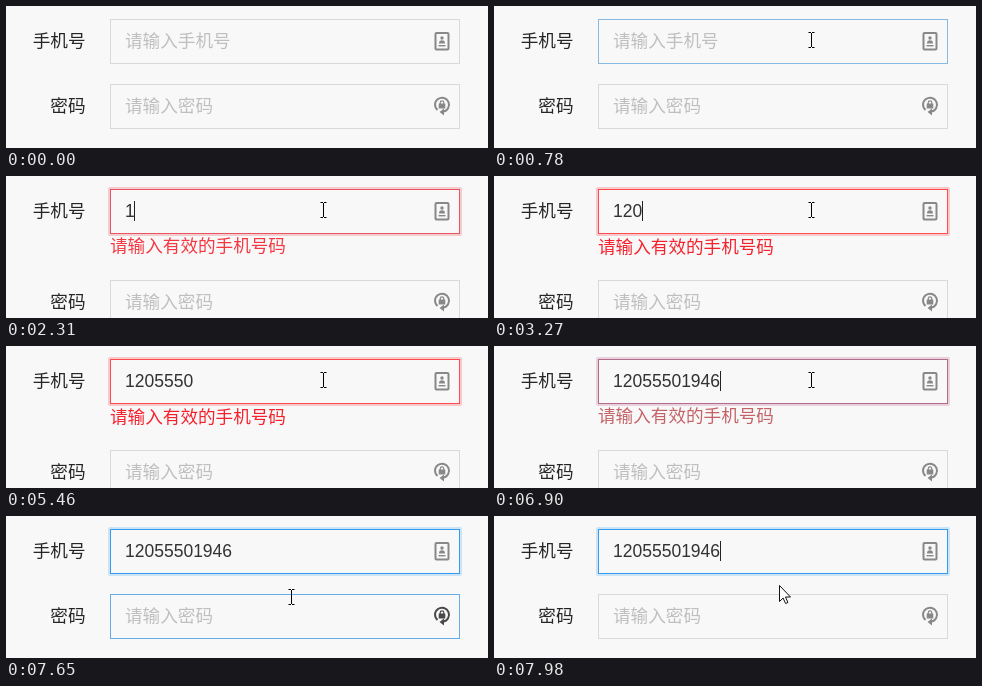
An HTML page for the animation above (8000 ms loop, 482 by 142 pixels).

```html
<!DOCTYPE html>
<html lang="zh">
<head>
<meta charset="utf-8">
<style>
  html, body { margin: 0; width: 100%; height: 100%; overflow: hidden; background: #f8f8f8; }
  svg { display: block; font: 300 17.6px "Noto Sans CJK SC", "Noto Sans CJK", sans-serif; fill: none; }
  .label { fill: #262626; text-anchor: end; }
  .hint { fill: #bfbfbf; }
  #value { fill: #333; font: 17.5px "Liberation Sans", Arial, sans-serif; }
  .icon { stroke: #888; stroke-width: 2; }
  .icon .solid { fill: #888; stroke: none; }
</style>
</head>
<body>
<svg width="482" height="142" viewBox="0 0 482 142">
  <rect id="glow" x="103" y="12" width="352" height="47" rx="1" stroke-width="2"/>
  <rect id="border1" x="104.5" y="13.5" width="349" height="44"/>
  <text class="label" x="79.5" y="41">手机号</text>
  <text class="hint" id="hint" x="119" y="41">请输入手机号</text>
  <text id="value" x="119" y="41"></text>
  <path id="caret" d="M0 25V45" stroke="#222"/>
  <g class="icon">
    <rect x="429.5" y="27" width="13" height="16.5" rx="1"/>
    <circle class="solid" cx="436" cy="32" r="1.7"/>
    <path class="solid" d="M433 37.5q0-3.2 3-3.2t3 3.2z"/>
    <path d="M432.5 39.7h7" stroke-width="1.4"/>
  </g>
  <text id="error" x="104" y="77">请输入有效的手机号码</text>
  <g id="row2">
    <rect id="border2" x="104.5" y="78.5" width="349" height="44"/>
    <text class="label" x="79.5" y="106">密码</text>
    <text class="hint" x="119" y="106">请输入密码</text>
    <g class="icon" id="lock">
      <path d="M431.5 104A7 7 0 1 1 437 105.6"/>
      <path class="solid" d="M433.5 106l4.5-3.5v7z"/>
      <rect class="solid" x="432.7" y="97.5" width="6.6" height="5" rx=".5"/>
      <path d="M434.2 98v-1.3a1.8 1.8 0 0 1 3.6 0V98" stroke-width="1.2"/>
    </g>
  </g>
  <path id="beam" d="M-3-7.5h2.5M.5-7.5H3M0-7V7M-3 7.5h2.5M.5 7.5H3" stroke="#000"/>
  <path id="arrow" d="M.5.5v16l3.6-3.5 2.5 5.5 2.3-1-2.4-5.5h5z" fill="#fff" stroke="#111"/>
</svg>
<script>
const LOOP = 8000, DIGIT = 9.73;
const NUMBER = "12055501946";
const keyTimes = [2130, 2970, 3270, 4230, 4440, 4740, 4980, 5670, 5790, 6510, 6810];
const caretOff = [[0, 1170], [1650, 2130], [2640, 2970], [3780, 4230], [5460, 5670], [6330, 6510], [7320, 7830]];
const mousePath = [
  [600, 457, 28], [660, 457, 28], [720, 331, 32], [780, 317, 34],
  [7290, 317, 34], [7410, 308, 44], [7530, 288, 82], [7590, 285, 86], [7650, 285, 81], [7740, 285, 69]
];
const GRAY = [217, 217, 217], BLUE = [52, 155, 238], RED = [255, 77, 79];
const ERROR = [245, 34, 45], MUTED = [136, 136, 136];

const $ = id => document.getElementById(id);
const set = (id, attrs) => { for (const k in attrs) $(id).setAttribute(k, attrs[k]); };
const show = (id, on) => set(id, { visibility: on ? "visible" : "hidden" });
const linear = (t, start, length = 300) => Math.min(1, Math.max(0, (t - start) / length));
// Close to the CSS "ease" curve
const ease = (t, start, length) => 1 - (1 - linear(t, start, length) ** 1.4) ** 3.3;
const mix = (a, b, p) => a.map((v, i) => v + (b[i] - v) * p);
const rgb = c => `rgb(${c.map(Math.round)})`;

function mouseAt(t) {
  const next = mousePath.findIndex(k => k[0] > t);
  if (next < 1) return mousePath[next < 0 ? mousePath.length - 1 : 0].slice(1);
  const a = mousePath[next - 1], b = mousePath[next];
  return mix(a, b, (t - a[0]) / (b[0] - a[0])).slice(1);
}

function draw(t) {
  // Phone field
  const typed = keyTimes.filter(k => k <= t).length;
  const invalid = ease(t, 2130) - ease(t, 6830);
  set("border1", { stroke: rgb(mix(mix(GRAY, BLUE, ease(t, 690)), RED, invalid)) });
  set("glow", { stroke: rgb(mix(BLUE, ERROR, invalid)), "stroke-opacity": 0.22 * ease(t, 1170, 240) });
  $("value").textContent = NUMBER.slice(0, typed);
  show("hint", !typed);
  show("caret", !caretOff.some(([from, to]) => t >= from && t < to));
  set("caret", { transform: `translate(${Math.floor(119 + typed * DIGIT) + 0.5})` });

  // Validation message pushes the second row down
  const open = t >= 2130 && t < 7110;
  const shown = ease(t, 2130) - linear(t, 6810) ** 2;
  show("error", open);
  set("error", {
    fill: rgb(mix(ERROR, MUTED, ease(t, 6810))),
    opacity: shown,
    transform: `translate(0 ${-6 * (1 - shown)})`
  });
  set("row2", { transform: `translate(0 ${open ? 26 : 0})` });

  // Password field hover
  const hover = ease(t, 7520) * (1 - ease(t, 7675));
  set("border2", { stroke: rgb(mix(GRAY, BLUE, hover)) });
  set("lock", { style: `filter:brightness(${1 - 0.65 * hover})` });

  // Pointer
  const [x, y] = mouseAt(t).map(Math.round);
  const inField = x < 454 && (y >= 13 && y < 58 || y >= 78 && y < 123);
  show("beam", t >= 600 && inField);
  show("arrow", t >= 600 && !inField);
  set("beam", { transform: `translate(${x + 0.5} ${y})` });
  set("arrow", { transform: `translate(${x} ${y})` });
}

const began = performance.now();
function tick() {
  draw((performance.now() - began) % LOOP);
  requestAnimationFrame(tick);
}
tick();
</script>
</body>
</html>
```
